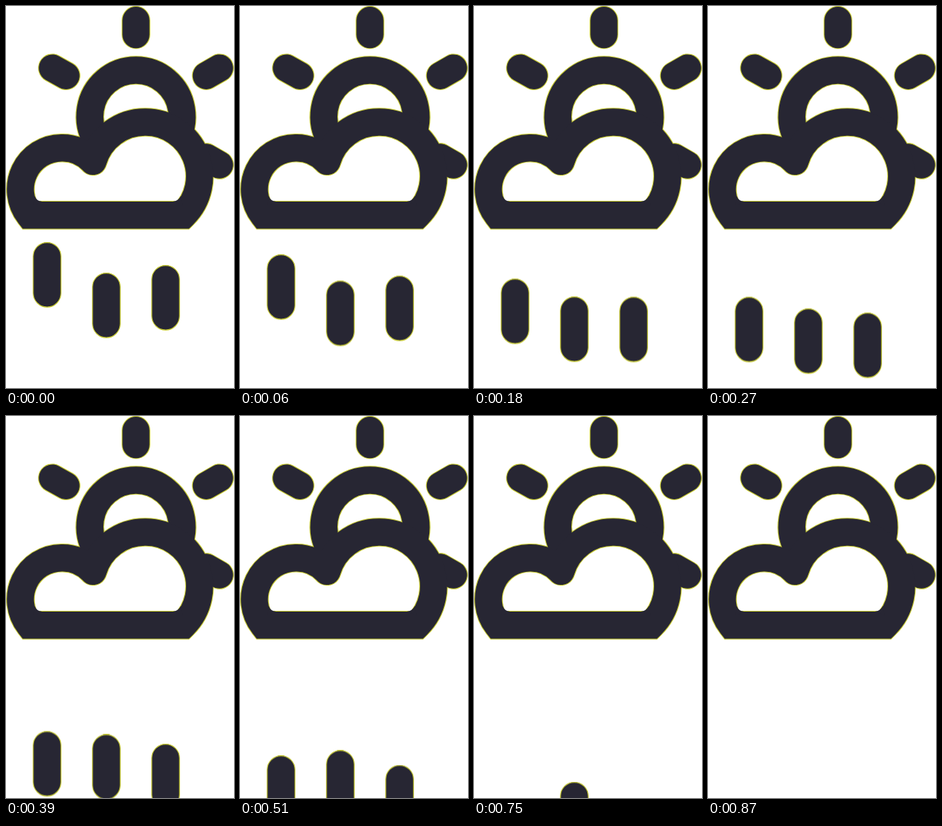
An HTML page without scripts for the animation above (900 ms loop, 300 by 500 pixels).

```html
<!DOCTYPE html>
<html lang="en">
<head>
<meta charset="utf-8">
<title>Sun, cloud and rain</title>
<style>
  :root { --ink: #272633; --rim: #c6c92f; }
  html, body { margin: 0; width: 100%; height: 100%; overflow: hidden; background: #fff; }
  svg { display: block; width: 100vw; height: 100vh; }
  .rim { stroke: var(--rim); stroke-width: 37.6; }
  .ink { stroke: var(--ink); stroke-width: 35.5; }
  .corner { fill: var(--ink); }
  .drop {
    fill: var(--ink);
    stroke: var(--rim);
    stroke-width: 1.1;
    animation: fall 900ms steps(30) -1ms infinite;
  }
  @keyframes fall { to { transform: translateY(var(--fall)); } }
</style>
</head>
<body>
<svg viewBox="0 0 300 500">
  <defs>
    <g id="weather" fill="none">
      <path d="M119 176A60.7 60.7 0 1 1 223 176"/>
      <path stroke-linecap="round" d="M171 18.7V37.5M61 81.2L79 91.2M281 81.2L263.5 91.2M263.5 198L281 208"/>
      <path stroke-linecap="round" stroke-miterlimit="10"
        d="M114.5 203.3A54.3 54.3 0 0 0 73 185.7A54.3 54.3 0 0 0 30.7 273.7H233.4A71 71 0 0 0 184 152A71 71 0 0 0 114.5 203.3"/>
    </g>
  </defs>

  <use href="#weather" class="rim"/>
  <use href="#weather" class="ink"/>
  <path class="corner" d="M38 249Q40.5 255.5 47 255.7L36 262zM230 249Q226 255.5 220 255.7L233 262z"/>

  <rect class="drop" style="--fall:238.5px" x="35.8" y="309.6" width="36.5" height="84.5" rx="18.25"/>
  <rect class="drop" style="--fall:155.7px" x="113.8" y="349.6" width="36.5" height="84.5" rx="18.25"/>
  <rect class="drop" style="--fall:207.5px" x="191.8" y="339.6" width="36.5" height="84.5" rx="18.25"/>
</svg>
</body>
</html>
```
